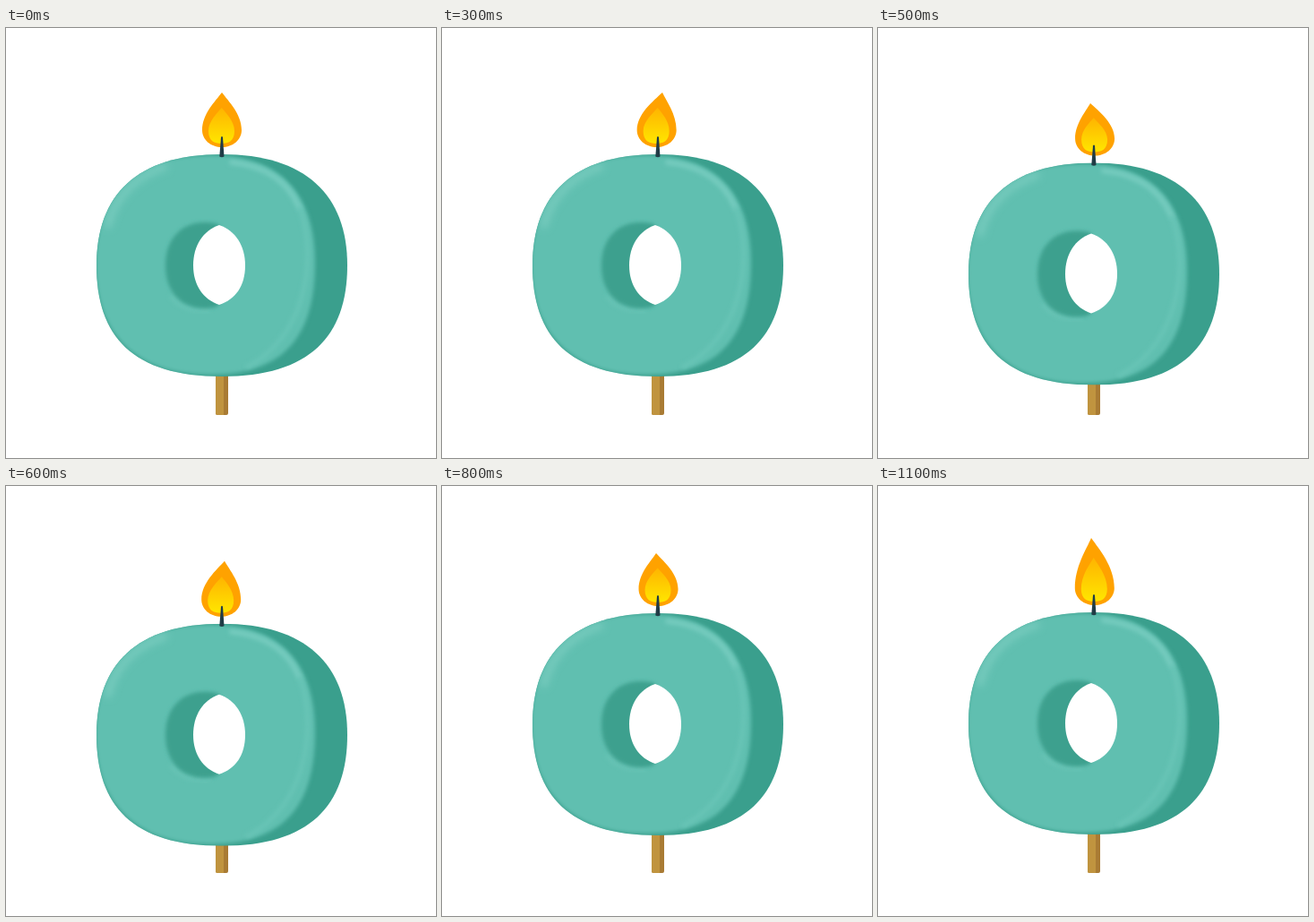
Animation of 480 by 480 pixels, one loop 1.2 s. Source, as an HTML page:

```html
<!DOCTYPE html>
<html lang="en">
<head>
<meta charset="utf-8">
<title>Candle</title>
<style>
html, body { margin: 0; width: 100%; height: 100%; overflow: hidden; background: #fff; }
svg { display: block; width: 100vw; height: 100vh; }
</style>
</head>
<body>
<svg viewBox="0 0 480 480">
  <defs>
    <clipPath id="outline">
      <path d="M101 265C101 186 146 141 241 141C334 141 381 186 381 265C381 344 339 389 241 389C141 389 101 344 101 265Z"/>
    </clipPath>
    <filter id="soft" x="-20%" y="-20%" width="140%" height="140%"><feGaussianBlur stdDeviation="2.2"/></filter>
    <filter id="glow" x="-40%" y="-40%" width="180%" height="180%"><feGaussianBlur stdDeviation="4"/></filter>
    <linearGradient id="fire" x1="0" y1="0" x2="0" y2="1">
      <stop offset="0" stop-color="#ffb400"/>
      <stop offset="1" stop-color="#ffe600"/>
    </linearGradient>
  </defs>

  <rect x="234" y="370" width="14" height="62" rx="2" fill="#a97b34"/>
  <path d="M234 370H243V432H236Q234 432 234 430Z" fill="#c0943f"/>

  <g id="candle">
    <g clip-path="url(#outline)">
      <rect x="100" y="140" width="282" height="250" fill="#3a9f8d"/>
      <path d="M100 264C100 186 143 142 228 142C308 142 345 187 345 262C345 342 312 387 228 387C141 387 100 338 100 264Z" fill="#60bfb0" filter="url(#soft)"/>
      <path d="M252 150C288 154 314 170 327 200" fill="none" stroke="#74cbbe" stroke-width="6" stroke-linecap="round" filter="url(#soft)"/>
      <path d="M327 200C345 240 344 340 268 379" fill="none" stroke="#68c4b6" stroke-width="5" filter="url(#soft)"/>
      <path d="M114 220C121 190 143 166 177 155" fill="none" stroke="#7acdc0" stroke-width="7" stroke-linecap="round" filter="url(#glow)"/>
      <path d="M184 299C194 312 208 316 228 315" fill="none" stroke="#69c4b6" stroke-width="4" filter="url(#soft)"/>
      <path d="M238 220C232 217 226 217 222 217C195 217 178 236 178 265C178 294 195 313 222 313C228 313 234 312 238 309L244 265Z" fill="#3c a08e" style="fill:#3ca08e" filter="url(#soft)"/>
      <path d="M238 220C256 226 267 243 267 265C267 288 256 303 238 309C220 303 209 287 209 265C209 243 220 226 238 220Z" fill="#fff"/>
    </g>
    <path id="outer" fill="#ffa200"/>
    <path id="inner" fill="url(#fire)"/>
    <path d="M240 122Q241 120 242 122L243.5 143.5Q241 145 238.3 143.5Z" fill="#213c46"/>
  </g>
</svg>
<script>
const STEP = 100;
// [candle drop, flame tip x, flame tip y relative to the candle]
const poses = [
  [0, 241, 72], [0, 243, 63], [0, 245, 58], [0, 246, 72],
  [2.6, 237, 61.5], [9.5, 237, 74.5], [12.8, 244, 71], [8.2, 248.5, 65],
  [1, 239, 74], [0, 242, 69], [0, 241, 61], [0, 238, 58]
];
const [candle, outer, inner] = ["candle", "outer", "inner"].map(id => document.getElementById(id));

function drop(tipX, tipY, x, half, wideY, bottom, lean) {
  const neckY = tipY + (wideY - tipY) * 0.23;
  const bellyY = wideY - (wideY - tipY) * 0.43;
  const neck = half * 0.33;
  const round = half * 0.55;
  return `M${tipX} ${tipY}C${lean + neck} ${neckY} ${x + half} ${bellyY} ${x + half} ${wideY}` +
    `C${x + half} ${wideY + 11} ${x + round} ${bottom} ${x} ${bottom}` +
    `C${x - round} ${bottom} ${x - half} ${wideY + 11} ${x - half} ${wideY}` +
    `C${x - half} ${bellyY} ${lean - neck} ${neckY} ${tipX} ${tipY}Z`;
}

function draw(time) {
  const [fall, tipX, tipY] = poses[Math.floor(time / STEP) % poses.length];
  const bend = tipX - 241;
  const base = 241 - bend * 0.27;
  candle.setAttribute("transform", `translate(0 ${fall})`);
  outer.setAttribute("d", drop(tipX, tipY, base, 22, 114, 133, 241 + bend * 0.4));
  inner.setAttribute("d", drop(240.7, 80 + (tipY - 58) * 0.65, base - 0.5, 14.5, 115, 129, 240.7));
}

function tick(now) {
  draw(now);
  requestAnimationFrame(tick);
}
draw(0);
requestAnimationFrame(tick);
</script>
</body>
</html>
```
